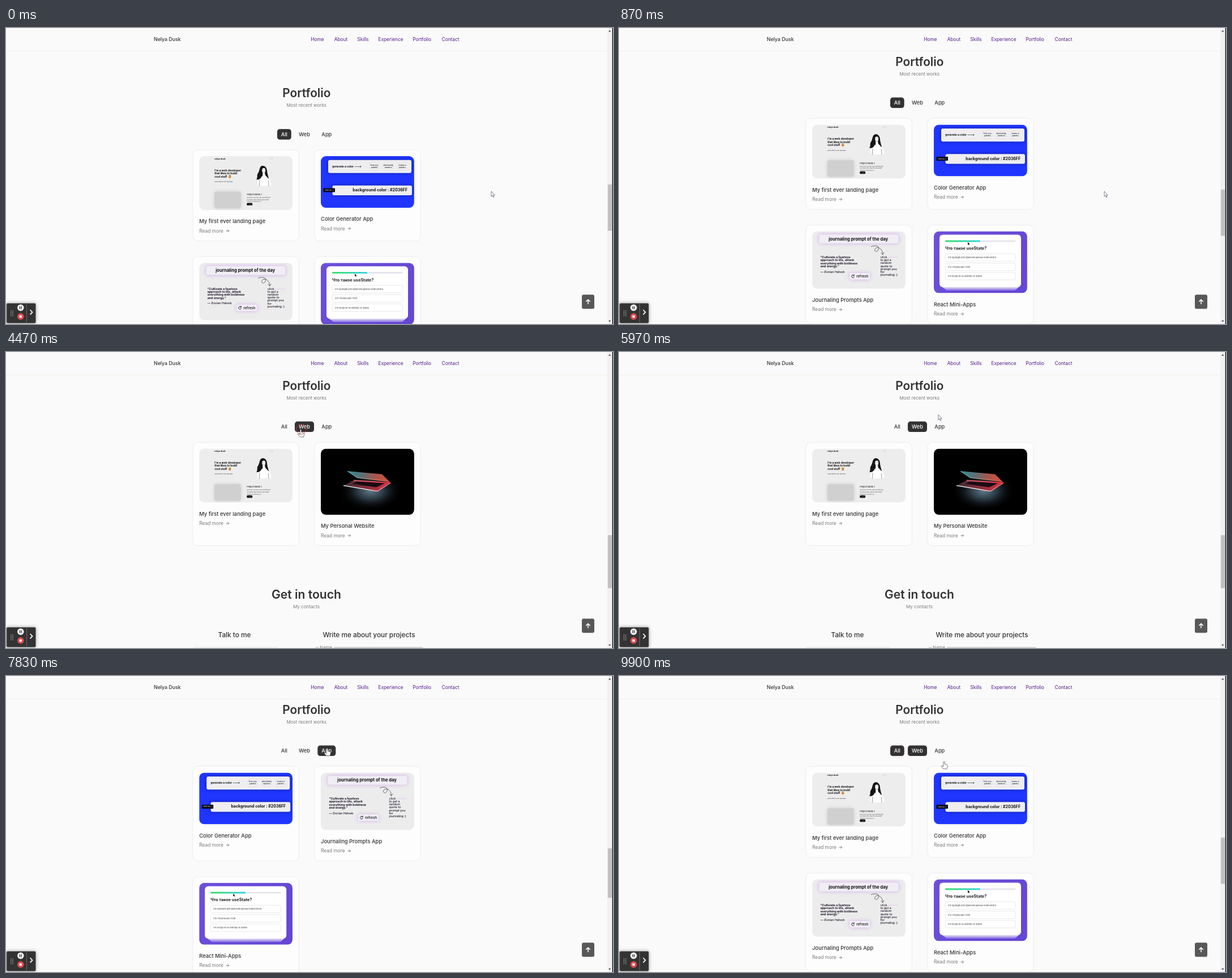
Animation, 1072 px wide and 522 px high, one loop 9.93 s. Source, as an HTML page with a canvas:

```html
<!DOCTYPE html>
<html lang="en">
<head>
<meta charset="utf-8">
<title>Portfolio filter</title>
<style>
html, body { margin: 0; width: 100%; height: 100%; overflow: hidden; background: #fafafa; }
canvas { display: block; width: 1072px; height: 522px; }
</style>
</head>
<body>
<canvas id="stage" width="1072" height="522"></canvas>
<script>
const ctx = document.getElementById('stage').getContext('2d');
const LOOP = 9930, INK = '#333', GREY = '#7b7b7b', PAPER = '#fafafa';

const lerp = (a, b, k) => a + (b - a) * k;
const ease = u => { u = Math.min(1, Math.max(0, u)); return u * u * (3 - 2 * u); };

// ---------- drawing helpers ----------
function text(s, x, y, size, weight = 400, color = INK, align = 'left') {
  ctx.font = `${weight} ${size}px Inter, sans-serif`;
  ctx.fillStyle = color;
  ctx.textAlign = align;
  ctx.fillText(s, x, y);
}
function lines(list, x, y, step, ...style) {
  list.forEach((s, i) => text(s, x, y + i * step, ...style));
}
function box(x, y, w, h, r, fill, stroke, glow) {
  ctx.beginPath();
  ctx.roundRect(x, y, w, h, r);
  if (glow) { ctx.shadowColor = glow; ctx.shadowBlur = 6; }
  if (fill) { ctx.fillStyle = fill; ctx.fill(); }
  ctx.shadowBlur = 0;
  if (stroke) { ctx.strokeStyle = stroke; ctx.lineWidth = .8; ctx.stroke(); }
}
function path(d, fill, stroke, width = 1) {
  const p = new Path2D(d);
  if (fill) { ctx.fillStyle = fill; ctx.fill(p); }
  if (stroke) { ctx.strokeStyle = stroke; ctx.lineWidth = width; ctx.stroke(p); }
}
function disc(x, y, r, fill) {
  ctx.beginPath();
  ctx.arc(x, y, r, 0, 7);
  ctx.fillStyle = fill;
  ctx.fill();
}
function gradient(x0, y0, x1, y1, ...colors) {
  const g = ctx.createLinearGradient(x0, y0, x1, y1);
  colors.forEach((c, i) => g.addColorStop(i / (colors.length - 1), c));
  return g;
}
function at(x, y, draw) {
  ctx.save();
  ctx.translate(x, y);
  draw();
  ctx.restore();
}

// ---------- card pictures, 165 px wide ----------
function drawLanding() {
  box(0, 0, 165, 95, 0, '#ededed');
  text('nelya.dusk', 27, 5.5, 3.6, 700, '#111');
  box(125, 2.8, 5, 2.6, 1.3, '#f6f6f6', '#ccc');
  lines(["I'm a web developer", 'that likes to build', 'cool stuff'], 27, 26.6, 5.4, 4.8, 700, '#111');
  box(52, 33, 4.2, 5.6, 1.5, '#c8924a');
  text('click here to see my links', 27, 46, 2.7, 500, '#555');
  path('M103 53C101 45 103 38 109 34L116 33C122 35 127 42 128 53Z', '#fff', '#ddd', .4);
  path('M111 17C106 18 107 26 104 30C101 34 104 37 101 41C105 42 109 40 110 36L116 33C119 35 120 38 123 40C122 36 121 33 120 28C120 20 116 16 111 17Z', '#161616');
  path('M111 24C111 20 117 20 117 24C117 28 116 30.5 114 30.5C112 30.5 111 27 111 24ZM112 30L116 30L117 35L112 37Z', '#fff');
  path('M112 24h1.3M115 24h1.3M113.3 28.3h1.6M107 42L106 53M122 43L123 53', null, '#333', .5);
  box(27, 62.7, 46.5, 29, 3, '#d0d0d0', null, '#ccc');
  text('Project name 1', 84, 69, 3.8, 500, '#222');
  lines(['Use tools you like, and something it', 'you learn more about it and what', 'comes of stories by it'], 84, 74, 3.6, 2.5, 400, '#555');
  box(84, 82.3, 10, 4.4, 1.6, '#111');
  text('-->', 89, 85.5, 2.6, 500, '#fff', 'center');
}
function drawColors() {
  box(0, 0, 165, 91, 0, '#2036ff');
  box(13, 6.7, 147, 23, 3, '#eeeef0', null, '#1020a0');
  text('generate a color --->', 20, 19.6, 4.8, 700, '#111');
  [['from my', 'palette'], ['absolutely', 'random'], ['create a', 'palette']].forEach((pair, i) => {
    const x = 94.5 + i * 24.6;
    box(x - 8, 10.5, 16, 14, 2, null, '#e2e2e4');
    lines(pair, x, 16.4, 4, 3.5, 500, '#222', 'center');
  });
  box(20.5, 51.7, 140.5, 17.3, 3, '#eeeef0', null, '#1020a0');
  text('background color : #2036FF', 153, 62, 7, 700, '#111', 'right');
  box(4.5, 56.5, 20.5, 7, 1, '#0a0a14');
  text('click me :)', 14.7, 61, 3, 500, '#ddd', 'center');
}
function drawJournal() {
  const dark = '#1a1226';
  box(0, 0, 165, 101.2, 0, '#ececec');
  box(12, 5.5, 140.5, 16, 4, '#f1edf5', '#e6d9ef', '#d7a8ee');
  text('journaling prompt of the day', 81.5, 16, 7.6, 700, '#111', 'center');
  lines(['"Cultivate a fearless', 'approach to life, attack', 'everything with boldness', 'and energy."'], 14.5, 47.3, 5.45, 5.3, 700, dark);
  text('— Dorian Halvek', 14.5, 73.2, 5.4, 500, dark);
  box(66, 73.5, 36, 11.5, 2.5, '#f2eef6', null, '#d7a8ee');
  path('M73.6 77.6A2.4 2.4 0 1 0 74.2 80M74.2 76v2.2h-2.2', null, '#111', .9);
  text('refresh', 78, 81.6, 6.2, 500, '#111');
  text('click', 120.5, 47.3, 5.3, 500, dark);
  text('refresh', 133.7, 47.3, 5.3, 500, '#e6cdf0');
  lines(['to get a', 'random', 'quote to', 'prompt you', 'for', 'journaling :)'], 120.5, 52.5, 5.2, 5.3, 500, dark);
  path('M104 27C111 24 119 25 117 32C115 38 109 36 111 31C114 26 124 29 124.5 40M121.5 37.5L124.5 41L127 37', null, '#333', .7);
}
function drawReact() {
  box(0, 0, 165, 109, 0, gradient(0, 0, 165, 109, '#6d50da', '#6446d2'));
  box(18, 20, 130, 84, 6, '#a493e8');
  box(14, 15, 137, 86, 6, '#d0c7f3');
  box(10, 6, 144, 92.5, 6, '#fff');
  box(20, 16, 124.5, 2.7, 1.3, '#e3e3ec');
  box(20, 16, 62, 2.7, 1.3, gradient(20, 0, 82, 0, '#2fe05c', '#2fd3e8'));
  path('M60 19v4.8l1.1-1 .9 1.8 .8-.4-.8-1.6h1.5z', '#111');
  text('Что такое useState?', 20, 32.5, 7.3, 700, '#222');
  ['Это функция для хранения данных компонента', 'Это глобальный стейт', 'Это когда ни ты никому не нужен'].forEach((s, i) => {
    box(20, 39.6 + i * 16.4, 124, 13.2, 2, '#fff', '#e2e2e6');
    text(s, 24.5, 47.5 + i * 16.4, 3.7, 400, '#444');
  });
}
function drawLaptop() {
  box(0, 0, 165, 117, 0, '#000');
  const glow = ctx.createRadialGradient(88, 118, 2, 88, 118, 56);
  glow.addColorStop(0, '#5c7484');
  glow.addColorStop(.4, '#2a3842');
  glow.addColorStop(1, '#00000000');
  at(0, 0, () => { ctx.scale(1, .63); box(30, 60, 120, 116, 0, glow); });
  path('M40 65L58 56L123 60L100 75Z', gradient(40, 0, 123, 0, '#3c2a34', '#8c2c3c', '#d8344a'));
  path('M55 62L64 58L113 61L98 68Z', '#180c12');
  path('M58 56L123 60', null, gradient(58, 0, 123, 0, '#f06a70', '#ff3048'), 1.6);
  path('M40 65L100 75L123 60.5', null, gradient(40, 0, 123, 0, '#cfe6ea', '#f4e4e2', '#e86a64'), 1.3);
  path('M47 39.5L108 45L121 58L64 51Z', gradient(47, 0, 121, 0, '#2c8f98', '#5a7076', '#a8564c', '#d8503c'));
  path('M47 39.5L64 51L121 58', null, gradient(47, 0, 121, 0, '#8fdce0', '#f0a48c', '#ff6a50'), .9);
}

const cards = {
  landing: { title: 'My first ever landing page', height: 95, draw: drawLanding },
  colors: { title: 'Color Generator App', height: 91, draw: drawColors },
  journal: { title: 'Journaling Prompts App', height: 101.2, draw: drawJournal },
  react: { title: 'React Mini-Apps', height: 109, draw: drawReact },
  personal: { title: 'My Personal Website', height: 116.6, draw: drawLaptop },
};

// ---------- filtered layouts ----------
function layout(names, thumbTop, thumbHeight) {
  const view = { spots: {}, thumbTop, thumbHeight };
  let y = 159.3;
  for (let i = 0; i < names.length; i += 2) {
    const row = names.slice(i, i + 2);
    const h = Math.max(...row.map(n => cards[n].height)) + 65.6;
    row.forEach((n, col) => view.spots[n] = { x: 330 + col * 214.8, y, h });
    view.bottom = y + h;
    y += h + 27.5;
  }
  return view;
}
const views = {
  All: layout(['landing', 'colors', 'journal', 'react', 'personal'], 285, 81.5),
  Web: layout(['landing', 'personal'], 323, 93.5),
  App: layout(['colors', 'journal', 'react'], 304, 87),
};
const pills = { All: [479, 24.7], Web: [510, 34], App: [550.3, 32] };
const steps = [[0, 'All'], [4200, 'Web'], [6500, 'App'], [8550, 'Web'], [9350, 'All']];

// time, x, y of the pointer tip
const track = [
  [0, 857, 288], [1700, 857, 288], [3030, 700, 340], [4080, 520.5, 136.5], [5250, 520.5, 136.5],
  [5930, 564, 110.5], [6020, 564, 110.5], [6330, 567, 127.5], [8150, 567, 127.5], [8430, 527, 132],
  [8800, 527, 132], [9180, 491, 132], [9650, 491, 132], [9900, 574, 150.5], [LOOP, 574, 150.5],
];
function pointer(t) {
  const i = Math.max(1, track.findIndex(k => k[0] >= t));
  const [t0, x0, y0] = track[i - 1], [t1, x1, y1] = track[i];
  const k = ease((t - t0) / (t1 - t0));
  return [lerp(x0, x1, k), lerp(y0, y1, k)];
}
// hover styles trail the pointer a little
function hovered(t) {
  const [x, y] = pointer(Math.max(0, t - 120));
  return Object.keys(pills).find(n => x > pills[n][0] && x < pills[n][0] + pills[n][1] && y > 120 && y < 145);
}

function drawCard(card, from, to, k) {
  if (!from && !to) return;
  const shown = lerp(from ? 1 : 0, to ? 1 : 0, k);
  if (shown < .01) return;
  const a = from || to, b = to || from, h = lerp(a.h, b.h, k);
  at(lerp(a.x, b.x, k) + 93.7, lerp(a.y, b.y, k) + h / 2, () => {
    ctx.globalAlpha = shown;
    ctx.scale(shown, shown);
    ctx.translate(-93.7, -h / 2);
    box(0, 0, 187.4, h, 9, '#fdfdfd', '#e9e9ef');
    at(11.2, 11.2, () => {
      const end = card.height;
      at(0, 0, () => {
        ctx.beginPath();
        ctx.roundRect(0, 0, 164.8, end, 9);
        ctx.clip();
        card.draw();
      });
      text(card.title, 0, end + 23, 9.4, 500);
      text('Read more', 0, end + 39.6, 8.4, 400, GREY);
      path(`M47.5 ${end + 36.7}h5m-2.3-2.3l2.3 2.3l-2.3 2.3`, null, '#666', .8);
    });
  });
}

function drawPage(t, from, to, k, active) {
  text('Portfolio', 530.8, 66.8, 20.8, 600, INK, 'center');
  text('Most recent works', 530.8, 83.6, 8, 400, GREY, 'center');
  const hover = hovered(t);
  for (const name in pills) {
    const [x, w] = pills[name], dark = name === active || name === hover;
    if (dark) box(x, 122.6, w, 18.5, 4.5, '#323232');
    text(name, x + w / 2, 135.2, 9.2, 500, dark ? '#fff' : INK, 'center');
  }
  for (const name in cards) drawCard(cards[name], from.spots[name], to.spots[name], k);

  at(0, lerp(from.bottom, to.bottom, k) - 341.5, () => {
    text('Get in touch', 530.5, 435, 21.1, 600, INK, 'center');
    text('My contacts', 530.5, 452, 8.1, 400, GREY, 'center');
    text('Talk to me', 403.5, 503, 11.8, 500, INK, 'center');
    text('Write me about your projects', 641, 503, 11.8, 500, INK, 'center');
    box(326, 521, 158, 70, 8, '#fdfdfd', '#dedee4');
    box(544.5, 521, 194, 36, 5, null, '#9a98a6');
    box(552, 518, 27, 6, 0, PAPER);
    text('Name', 554, 524, 8, 400, GREY);
  });
}

function drawHeader() {
  box(0, 0, 1062, 40, 0, PAPER);
  box(0, 40, 1062, 1, 0, '#eeefe8');
  text('Nelya Dusk', 261, 23.4, 8.8, 500);
  [['Home', 550], ['About', 591.5], ['Skills', 630.5], ['Experience', 679.5], ['Portfolio', 734.7], ['Contact', 785]]
    .forEach(([s, x]) => text(s, x, 23, 8.3, 400, '#551a8b', 'center'));
}

function drawOverlay(thumbTop, thumbHeight) {
  box(1017, 470.3, 22, 25, 3, '#585858');
  path('M1028 487v-8m-3.6 3.6l3.6-3.6l3.6 3.6', null, '#fff', 1.5);

  box(1062, 0, 10, 522, 0, '#f1f1f1');
  box(1062.8, thumbTop, 7.4, thumbHeight, 0, '#c1c1c1');
  path('M1064 6.5l2.2-2.8l2.2 2.8zM1064 515.8l2.2 2.8l2.2-2.8z', '#444');
  box(1070.7, 0, 1.3, 522, 0, '#111');

  box(1, 485.5, 51.5, 35, 2, '#333', '#8a8a8a', '#999');
  for (let i = 0; i < 8; i++) disc(8.8 + (i % 2) * 3.2, 499 + (i >> 1) * 2.8, .75, '#ccc');
  disc(25.8, 493.2, 5.8, '#f4f4f4');
  box(23.8, 490.7, 1.3, 5, 0, '#333');
  box(26.5, 490.7, 1.3, 5, 0, '#333');
  disc(25.8, 508.8, 5.8, '#e0484f');
  box(23.7, 506.7, 4.2, 4.2, .6, '#fff');
  box(36, 487, .8, 32, 0, '#777');
  path('M42.6 497l4 4.2l-4 4.2', null, '#fff', 1.7);
}

function drawPointer(t) {
  const [x, y] = pointer(t);
  at(x, y, () => {
    if (hovered(t))
      path('M-1.2 1Q0-.8 1.2 1V5L5 6Q6.6 6.5 6.3 9L5 13.3H-1.4L-5 8.8Q-4.6 7-3 7.9L-1.2 9.2Z', '#fff', '#444', .7);
    else
      path('M0 0V9.2L2.1 7.3L3.6 10.6L5 10L3.6 6.7H6.3Z', '#fff', '#4a4560', .7);
  });
  for (const [start] of steps.slice(1)) {
    const u = (t - start) / 600;
    if (u < 0 || u > 1) continue;
    const [cx, cy] = pointer(start);
    ctx.globalAlpha = 1 - u * u;
    ctx.beginPath();
    ctx.arc(cx + 1, cy, 5 + 8 * u, 0, 7);
    ctx.strokeStyle = '#e0363f';
    ctx.lineWidth = 1;
    ctx.stroke();
    ctx.globalAlpha = 1;
  }
}

function render(t) {
  const i = steps.findLastIndex(s => s[0] <= t);
  const active = steps[i][1], to = views[active], from = views[steps[Math.max(0, i - 1)][1]];
  const k = i ? ease((t - steps[i][0]) / 250) : 1;
  const unscrolled = 1 - ease((t - 350) / 250);

  box(0, 0, 1072, 522, 0, PAPER);
  at(0, 55.6 * unscrolled, () => drawPage(t, from, to, k, active));
  drawHeader();
  drawOverlay(lerp(from.thumbTop, to.thumbTop, k) - 9 * unscrolled, lerp(from.thumbHeight, to.thumbHeight, k));
  drawPointer(t);
}

function tick() {
  render(performance.now() % LOOP);
  requestAnimationFrame(tick);
}
tick();
</script>
</body>
</html>
```
